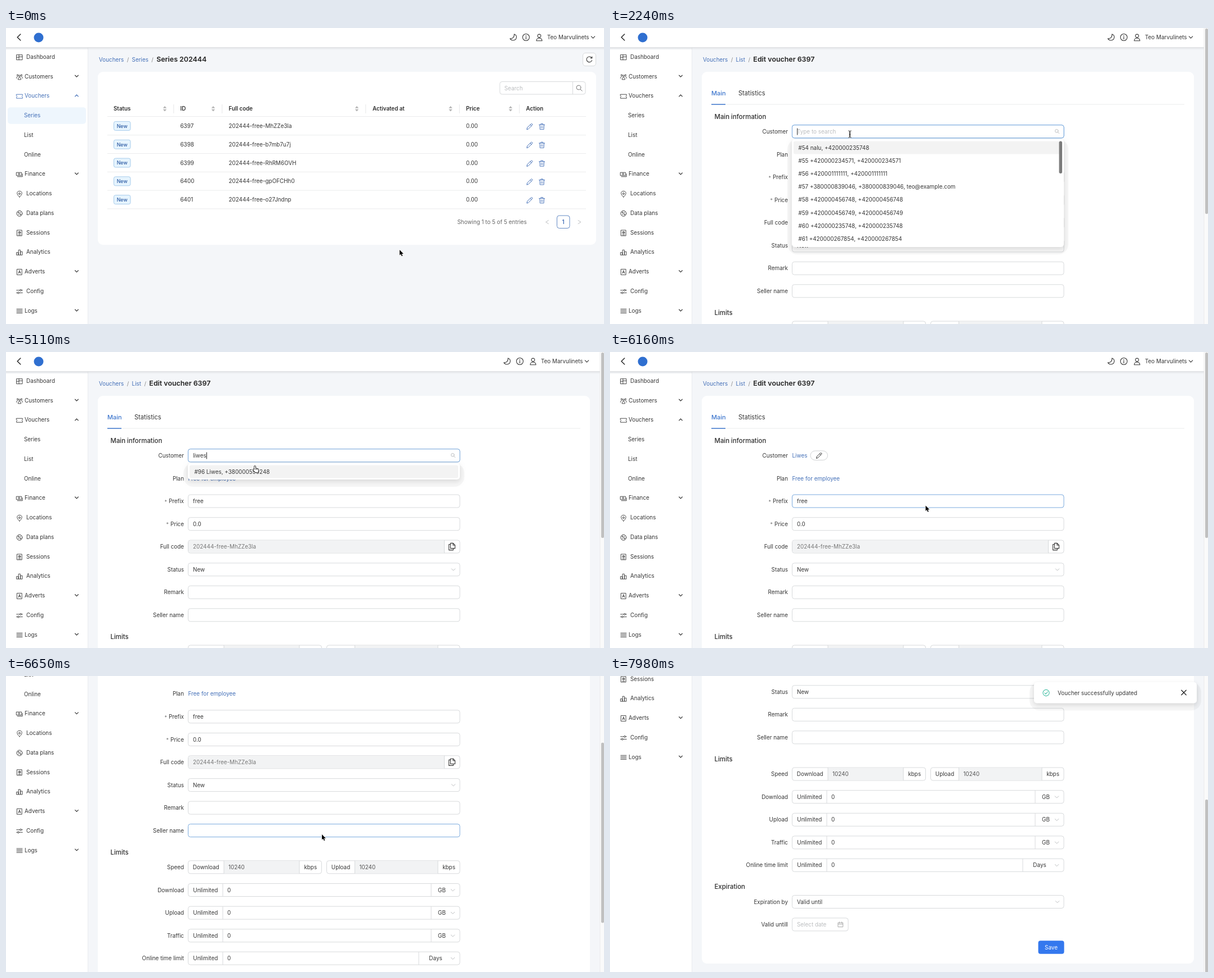
An HTML page with a canvas that plays this animation: 1062x527 px, repeating every 8750 ms.

```html
<!DOCTYPE html>
<html lang="en">
<head>
<meta charset="utf-8">
<title>Voucher editing</title>
<style>
html, body { margin: 0; width: 100%; height: 100%; overflow: hidden; background: #fff; }
canvas { display: block; width: 1062px; height: 527px; }
</style>
</head>
<body>
<canvas id="stage"></canvas>
<script>
const W = 1062, H = 527, LOOP = 8750, STEP = 70, MAX_SCROLL = 359;
const canvas = document.getElementById('stage');
const ctx = canvas.getContext('2d');
const dpr = window.devicePixelRatio || 1;
canvas.width = W * dpr;
canvas.height = H * dpr;

const INK = '#363636', BLUE = '#4470b8', LINE = '#d8dadc', PALE = '#bbbdbf', SOFT = '#f2f3f4', FOCUS = '#7aaade';
const OPEN = 2100, FILTER = 4130, PICK = 5250, EDIT = 1540;
const KEYS = [3080, 3290, 3500, 3640, 3780];
const QUERY = 'liwes', CUSTOMER = 'Liwes';

// time, x, y of the pointer
const PATH = [
  [0, 699, 395], [70, 800, 280], [140, 917, 157], [210, 917, 157], [350, 917, 171], [420, 917, 171],
  [770, 206, 292], [1050, 942, 159], [1120, 926, 177], [1680, 926, 177], [2030, 426, 189],
  [4760, 426, 189], [4970, 440, 203], [5250, 440, 203], [5460, 455, 210], [5530, 455, 210],
  [5670, 561, 270], [5810, 560, 258], [5950, 560, 265], [6020, 560, 265], [6300, 561, 282],
  [6930, 561, 282], [7210, 779, 476], [7420, 779, 476], [7840, 490, 386], [7910, 490, 504]
];

const ring = (r, x = 0, y = 0) => `M${x + r} ${y}a${r} ${r} 0 1 0 ${-2 * r} 0a${r} ${r} 0 1 0 ${2 * r} 0`;
const box = (x, y, w, h) => `M${x} ${y}h${w}v${h}h${-w}z`;
const ICONS = {
  Dashboard: box(-5, -4.5, 10, 9) + 'M-1-4.5v9M-5 0h4M-1-1h6',
  Customers: ring(1.5, 0, -1.5) + ring(1.2, -3.4, -3) + ring(1.2, 3.4, -3) + 'M-2.6 4.5c0-5 5.2-5 5.2 0zM-5.3 2.5c0-2 .5-3 2-3M5.3 2.5c0-2-.5-3-2-3',
  Vouchers: 'M-5.3-3.5h10.6v2.2a1.4 1.4 0 0 0 0 2.6v2.2h-10.6v-2.2a1.4 1.4 0 0 0 0-2.6z',
  Finance: box(-5.3, -3.5, 9, 5.5) + ring(1.4, -.8, -.8) + 'M-3.8 4h9v-5',
  Locations: 'M0 5.5C-6 .5-5.3-5 0-5S6 .5 0 5.5z' + ring(1.5, 0, -.5),
  'Data plans': ring(5) + ring(1, -1.8, -1.8) + ring(1, 1.8, 1.8) + 'M2.8-2.8l-5.6 5.6',
  Sessions: box(-4.2, -5, 8.4, 10) + ring(2, 0, -.7) + ring(.6, 0, -.7) + 'M-2 3.3h4',
  Analytics: box(-5, 0, 2.8, 4.5) + box(-1.4, -4.5, 2.8, 9) + box(2.2, -1.5, 2.8, 6),
  Adverts: box(-4.2, -5, 8.4, 10) + 'M-2 2.5L0-2.8 2 2.5M-1.3.8h2.6',
  Config: 'M-5.3-2.3h6M3.7-2.3h1.6M-5.3 2.3h1.6M-.7 2.3h6' + ring(1.5, 2.2, -2.3) + ring(1.5, -2.2, 2.3),
  Logs: 'M-5-3.6h10M-5-1.2h10M-5 1.2h10M-5 3.6h10',
  pencil: 'M-5 5l.8-3.2L2.4-4.5a1.4 1.4 0 0 1 2.1 2.1L-2.2 4.2zM1.1-3.2l2.1 2.1',
  trash: 'M-5-3.2h10M-1.8-3.2v-1.8h3.6v1.8M-3.9-3.2l.5 8.4h6.8l.5-8.4M-1.3-.6v3.4M1.3-.6v3.4',
  search: ring(3.9, -1, -1) + 'M1.8 1.8L5.2 5.2',
  reload: 'M4.6 1.6A4.9 4.9 0 1 1 4.2-2.6M4.8-5v2.8h-2.8',
  moon: 'M2-5.6C2.6 0-1 2.8-5.4 2.4 -2 7.4 6 6 6-.5 6-2.8 4.5-4.8 2-5.6z',
  info: ring(6) + 'M0-.8v4M0-3.2v1',
  user: ring(2.9, 0, -2.8) + 'M-5 6c0-6.5 10-6.5 10 0z',
  down: 'M-3.2-1.6L0 1.6 3.2-1.6',
  up: 'M-3.2 1.6L0-1.6 3.2 1.6',
  left: 'M2.4-3L-2.4 0 2.4 3',
  right: 'M-2.4-3L2.4 0-2.4 3',
  back: 'M2.8-5.6L-2.8 0 2.8 5.6',
  copy: 'M-2.5-5.8h4.5l3.2 3.2v5.6h-7.7zM1.8-5.6v3.2h3.2M-2.7-3.8h-2.5v9.6h7.4v-2.6',
  calendar: box(-4.4, -3.6, 8.8, 8) + 'M-4.4-.8h8.8M-2.2-5v2.4M2.2-5v2.4',
  done: ring(5.6) + 'M-2.6.2l2 2L2.8-2',
  close: 'M-4.2-4.2l8.4 8.4M4.2-4.2l-8.4 8.4'
};

const POINTERS = {
  arrow: 'M0 0v9.6l2.2-2 1.6 3.6 1.6-.7-1.6-3.5h3.1z',
  hand: 'M1.2.9c0-1.2 1.8-1.2 1.8 0v3.3l3.9.9c1.2.3 1.6 1 1.4 2.2l-.7 3.9h-4.8L-.6 7.3c-.9-1.2.3-2 1.1-1.2l.7.7z',
  beam: 'M-2.6-6c1.6 0 2.6.4 2.6 1.6v8.8c0 1.2-1 1.6-2.6 1.6M2.6-6C1-6 0-5.6 0-4.4v8.8C0 5.6 1 6 2.6 6M-1.2.8h2.4'
};
for (const set of [ICONS, POINTERS]) for (const k in set) set[k] = new Path2D(set[k]);

let now = 0, scroll = 0, px = 0, py = 0;

function text(s, x, y, color = INK, size = 9.9, weight = 400, align = 'left') {
  ctx.font = `${weight} ${size}px Inter, "Open Sans", sans-serif`;
  ctx.textAlign = align;
  ctx.fillStyle = color;
  ctx.fillText(s, x, y + size * 0.36);
  return ctx.measureText(s).width;
}

function rect(x, y, w, h, r, fill, stroke, width = 1) {
  ctx.beginPath();
  ctx.roundRect(x, y, w, h, r);
  if (fill) { ctx.fillStyle = fill; ctx.fill(); }
  if (stroke) { ctx.strokeStyle = stroke; ctx.lineWidth = width; ctx.stroke(); }
}

function line(x1, y1, x2, y2, color = LINE, width = 1) {
  ctx.beginPath();
  ctx.moveTo(x1, y1);
  ctx.lineTo(x2, y2);
  ctx.strokeStyle = color;
  ctx.lineWidth = width;
  ctx.stroke();
}

function icon(name, x, y, color = INK, size = 1, width = 1) {
  ctx.save();
  ctx.translate(x, y);
  ctx.scale(size, size);
  ctx.strokeStyle = color;
  ctx.lineWidth = width / size;
  ctx.lineJoin = ctx.lineCap = 'round';
  ctx.stroke(ICONS[name]);
  ctx.restore();
}

function popup(x, y, w, h) {
  rect(x - 8, y, w + 16, h + 13, 18, 'rgba(0,0,0,.035)');
  ctx.save();
  ctx.shadowColor = 'rgba(0,0,0,.13)';
  ctx.shadowBlur = 9 * dpr;
  ctx.shadowOffsetY = 3 * dpr;
  rect(x, y, w, h, 5, '#fff');
  ctx.restore();
}

const over = (x, y, w, h) => px >= x && px <= x + w && py + scroll >= y && py + scroll <= y + h;

function pointerAt(t) {
  let i = PATH.findIndex(p => p[0] > t);
  if (i < 0) i = PATH.length - 1;
  const [t0, x0, y0] = PATH[i - 1], [t1, x1, y1] = PATH[i];
  const k = Math.min(1, (t - t0) / (t1 - t0));
  return [x0 + (x1 - x0) * k, y0 + (y1 - y0) * k];
}

function scrollAt(t) {
  const k = Math.max(0, Math.min(1, (t - 6340) / 590));
  return MAX_SCROLL * k * k * (3 - 2 * k);
}

function header(shift) {
  const g = ctx.createLinearGradient(0, 34, 0, 39);
  g.addColorStop(0, 'rgba(0,0,0,.09)');
  g.addColorStop(1, 'rgba(0,0,0,0)');
  ctx.fillStyle = g;
  ctx.fillRect(0, 34, W, 5);
  ctx.fillStyle = '#fff';
  ctx.fillRect(0, 0, W, 34);
  icon('back', 23, 16.5, '#222', 1, 1.4);
  ctx.beginPath();
  ctx.arc(58, 17, 8.5, 0, 7);
  ctx.fillStyle = '#2f6fd0';
  ctx.fill();
  icon('moon', 900.5 - shift, 16.5, INK, 1, 1.1);
  icon('info', 923.5 - shift, 16.5, INK, 1, 1.1);
  icon('user', 947 - shift, 16.8, INK, 1, 1.1);
  text('Teo Marvulinets', 961 - shift, 16.8);
  icon('down', 1042.5 - shift, 16.5, INK, 1, 1.1);
}

function sidebar(inSeries) {
  ctx.fillStyle = '#fff';
  ctx.fillRect(0, 38, 145, 900);
  line(145.5, 35, 145.5, 938, '#eaecef');
  const items = ['Dashboard', 'Customers', 'Vouchers', 'Series', 'List', 'Online', 'Finance', 'Locations',
    'Data plans', 'Sessions', 'Analytics', 'Adverts', 'Config', 'Logs'];
  const groups = ['Customers', 'Vouchers', 'Finance', 'Adverts', 'Logs'];
  items.forEach((name, i) => {
    const y = 51.4 + 34.75 * i, group = groups.includes(name);
    const active = inSeries && (name === 'Vouchers' || name === 'Series');
    const color = active ? BLUE : INK;
    if (active && !group) rect(3, y - 14.5, 139, 29.5, 5, '#eef6fd');
    const sub = i > 2 && i < 6;
    text(name, sub ? 32 : group ? 33 : 36, y, color);
    if (!sub) icon(name, 24, y + .8, color, 1, .9);
    if (group) icon(name === 'Vouchers' ? 'up' : 'down', 125.5, y - .5, color, .88, 1.2);
  });
}

function crumbs(middle, title) {
  const put = (x, s, c, size, weight) => x + text(s, x, 56, c, size, weight) + 5.4;
  let x = put(165, 'Vouchers', BLUE);
  x = put(x, '/', '#888');
  x = put(x, middle, BLUE);
  x = put(x, '/', '#888');
  put(x, title, '#222', 12.4, 600);
}

function sorter(x) {
  ctx.fillStyle = '#b3b3b3';
  for (const d of [-1, 1]) {
    ctx.beginPath();
    ctx.moveTo(x - 3.2, 143.8 + d);
    ctx.lineTo(x + 3.2, 143.8 + d);
    ctx.lineTo(x, 143.8 + d * 4.8);
    ctx.fill();
  }
}

function listPage() {
  crumbs('Series', 'Series 202444');
  rect(1024.5, 44.5, 23, 23, 4.5, '#fff', LINE);
  icon('reload', 1036, 56, INK, 1, 1.1);
  rect(163, 78, 885, 308, 9, '#fff');
  rect(877, 95.5, 152, 22.5, 4, '#fff', LINE);
  line(1006.5, 95.5, 1006.5, 118);
  text('Search', 885, 107, PALE);
  icon('search', 1018, 107, '#777');

  const cols = [['Status', 191, 282], ['ID', 309.5, 368], ['Full code', 395.5, 623], ['Activated at', 651, 789.5],
    ['Price', 817, 896], ['Action', 923.5]];
  cols.forEach(([name, x, sort]) => {
    text(name, x, 143.8, '#2e2e2e', 9.8, 600);
    if (!sort) return;
    sorter(sort);
    line(sort + 15.8, 136, sort + 15.8, 152, '#e6e7e8');
  });
  line(180, 157.5, 1030, 157.5, '#ebeced');
  ['MhZZe3la', 'b7mb7u7j', 'RhRM6OVH', 'gpOFCHh0', 'o27Jndnp'].forEach((code, i) => {
    const y = 174.4 + 32.8 * i;
    rect(191.5, y - 8, 29.5, 16, 3, '#e6f4fe', '#a8cdec');
    text('New', 206.2, y + .2, '#2c5aa3', 8.8, 500, 'center');
    text(6397 + i, 309.5, y);
    text('202444-free-' + code, 395.5, y);
    text('0.00', 817, y);
    icon('pencil', 930, y + 1, BLUE);
    icon('trash', 951.7, y + 1, BLUE, 1, .9);
    line(180, y + 16.3, 1030, y + 16.3, '#ebeced');
  });
  text('Showing 1 to 5 of 5 entries', 801.5, 345, '#666');
  icon('left', 961, 345.5, PALE);
  rect(978.5, 334, 22.5, 22.5, 4, '#fff', '#6389c4');
  text('1', 989.7, 345.3, BLUE, 9.9, 600, 'center');
  icon('right', 1018.5, 345.5, PALE);
}

function label(s, y, required) {
  const w = text(s, 316, y, INK, 9.9, 400, 'right');
  if (required) text('*', 316 - w - 3, y + 1, '#777', 9, 400, 'right');
}

function field(y, value, color = INK, x = 323.5, w = 482.5) {
  rect(x, y - 11.5, w, 23, 4, '#fff', over(x, y - 11.5, w, 23) ? FOCUS : LINE);
  if (value) text(value, x + 8.5, y, color);
}

// A row of joined cells: left caption, input, right caption.
function group(y, x, a, b, end, caption, value, unit, disabled, select) {
  rect(x, y - 11.5, end - x, 23, 4, '#fff', LINE);
  if (disabled) {
    ctx.fillStyle = SOFT;
    ctx.fillRect(a, y - 11, b - a, 22);
  }
  const lit = !disabled && over(a, y - 11.5, b - a, 23);
  if (lit) rect(a, y - 11.5, b - a, 23, 0, null, FOCUS);
  else {
    line(a, y - 11.5, a, y + 11.5);
    line(b, y - 11.5, b, y + 11.5);
  }
  text(caption, (x + a) / 2, y, INK, 9.9, 400, 'center');
  text(value, a + 8, y, disabled ? '#555' : INK);
  text(unit, select ? (b + end) / 2 - 6.5 : (b + end) / 2, y, INK, 9.9, 400, 'center');
  if (select) icon('down', 793.5, y + .3, PALE);
}

function customerRow() {
  label('Customer', 184.3);
  if (now >= PICK) {
    text(CUSTOMER, 323.5, 184, BLUE);
    rect(356, 176, 30.5, 16.5, 8.2, '#fff', '#d0d2d4');
    icon('pencil', 371.3, 184.3, INK, .95);
    return;
  }
  const open = now >= OPEN;
  if (open) rect(322.3, 171.6, 485, 25.2, 5, 'rgba(70,140,230,.08)');
  field(184.3);
  if (open) rect(323.5, 172.8, 482.5, 23, 4, '#fff', FOCUS);
  const typed = QUERY.slice(0, KEYS.filter(k => now >= k).length);
  const w = typed ? text(typed, 332, 184.3) : (text('Type to search', 332, 184.3, PALE), 0);
  const off = (now >= 2730 && now < 3080) || (now >= 4340 && now < 4830);
  if (open && !off) line(332.7 + w, 178.5, 332.7 + w, 190.5, '#222');
  icon('search', 794, 184, PALE, .72);
}

function dropdown() {
  const all = now < FILTER;
  const pair = (id, n) => `#${id} +420${n}, +420${n}`;
  const items = all ? [
    '#54 nalu, +420000235748', pair(55, '000234571'), pair(56, '001111111'),
    '#57 +380000839046, +380000839046, teo@example.com',
    pair(58, '000456748'), pair(59, '000456749'), pair(60, '000235748'), pair(61, '000267854')
  ] : [`#96 ${CUSTOMER}, +380000590248`];
  popup(323, 198, 483, all ? 192 : 29);
  rect(326, 201.5, 477, 23, 3, '#f3f3f3');
  items.forEach((s, i) => text(s, 334.5, 213 + 23.2 * i));
  if (all) rect(797.5, 201.5, 5.5, 57.5, 2.7, '#7b7b7b');
}

function editPage() {
  crumbs('List', 'Edit voucher 6397');
  rect(163, 78, 874, 793, 9, '#fff');
  line(180, 136, 1020, 136, '#ebeced');
  text('Main', 180, 116.3, '#3d76cd', 11, 500);
  text('Statistics', 228, 116.3, INK, 11.1);
  line(180, 136, 205, 136, '#3d76cd', 1.5);

  const heading = (s, y) => text(s, 185.5, y, '#2e2e2e', 11.4, 500);
  heading('Main information', 157.8);
  customerRow();
  label('Plan', 225);
  text('Free for employee', 323.5, 225, BLUE);
  label('Prefix', 265.5, true);
  field(265.5, 'free');
  label('Price', 306.2, true);
  field(306.2, '0.0');
  label('Full code', 346.6);
  rect(323.5, 335, 482.5, 23, 4, '#fff', LINE);
  rect(324, 335.5, 454, 22, [4, 0, 0, 4], SOFT);
  line(778.5, 335, 778.5, 358);
  text('202444-free-MhZZe3la', 332, 346.6, '#777');
  icon('copy', 792, 346.5, INK, 1.05, 1.1);
  label('Status', 387.3);
  field(387.3, 'New');
  icon('down', 794.5, 387.5, PALE);
  label('Remark', 427.8);
  field(427.8);
  label('Seller name', 468.3);
  field(468.3);

  heading('Limits', 506.8);
  label('Speed', 533.5);
  group(533.5, 323.5, 387, 521, 560.5, 'Download', '10240', 'kbps', true);
  group(533.5, 569.5, 619.5, 767, 806, 'Upload', '10240', 'kbps', true);
  ['Download', 'Upload', 'Traffic'].forEach((s, i) => {
    const y = 574.2 + 40.6 * i;
    label(s, y);
    group(y, 323.5, 385, 755, 806, 'Unlimited', '0', 'GB', false, true);
  });
  label('Online time limit', 695.8);
  group(695.8, 323.5, 385, 733, 806, 'Unlimited', '0', 'Days', false, true);

  heading('Expiration', 734.3);
  label('Expiration by', 761);
  field(761, 'Valid until');
  icon('down', 794.5, 761.2, PALE);
  label('Valid untill', 801.4);
  field(801.4, 'Select date', PALE, 323.5, 99.5);
  icon('calendar', 409.5, 801.6, '#aaa', .95);
  rect(760.5, 830.3, 46, 23.5, 4, over(760, 830, 46, 24) ? '#5f99f8' : '#3478ee');
  text('Save', 783.5, 842.2, '#fff', 9.9, 400, 'center');
  if (now >= OPEN && now < PICK) dropdown();
}

function scrollbar() {
  ctx.fillStyle = '#fafafa';
  ctx.fillRect(1055, 0, 7, H);
  line(1055, 0, 1055, H, '#e9e9e9', .8);
  const h = 330 - 22 * Math.max(0, (scroll - 72) / (MAX_SCROLL - 72));
  rect(1057, scroll * .61 + 1, 5, h, 2, '#c0c0c0');
}

function notice() {
  const k = Math.max(0, Math.min(1, (now - 7560) / 210));
  if (!k) return;
  const dx = 309 * (1 - k) ** 2;
  ctx.save();
  ctx.globalAlpha = k;
  ctx.translate(dx, 0);
  popup(753, 11, 289, 37.5);
  icon('done', 774.5, 30, '#45bfa5', 1, 1.1);
  text('Voucher successfully updated', 795, 30);
  icon('close', 1019, 29.5, '#222', 1, 1.3);
  ctx.restore();
}

function pointer() {
  if ((now >= 3150 && now < 4830) || now >= 7980) return;
  let kind = 'arrow';
  if (now >= 1960 && now < 4900) kind = 'beam';
  else if ((now >= 4900 && now < 5320) || (now >= EDIT && over(760, 830, 46, 24))) kind = 'hand';
  const shape = POINTERS[kind];
  ctx.save();
  ctx.translate(px, py);
  ctx.lineJoin = 'round';
  ctx.strokeStyle = kind === 'hand' ? '#111' : '#fff';
  ctx.lineWidth = kind === 'hand' ? 1.7 : 1.6;
  ctx.stroke(shape);
  if (kind === 'beam') {
    ctx.strokeStyle = '#111';
    ctx.lineWidth = 1;
    ctx.stroke(shape);
  } else {
    ctx.fillStyle = kind === 'hand' ? '#fff' : '#000';
    ctx.fill(shape);
    if (kind === 'hand') {
      ctx.beginPath();
      for (const x of [3.1, 4.8, 6.4]) {
        ctx.moveTo(x, 4.8);
        ctx.lineTo(x, 6.6);
      }
      ctx.strokeStyle = '#111';
      ctx.lineWidth = .7;
      ctx.stroke();
    }
  }
  ctx.restore();
}

function draw(ms) {
  now = Math.floor((ms % LOOP) / STEP) * STEP;
  scroll = scrollAt(now);
  [px, py] = pointerAt(now);
  const editing = now >= EDIT;
  ctx.setTransform(dpr, 0, 0, dpr, 0, 0);
  ctx.fillStyle = '#f4f6f9';
  ctx.fillRect(0, 0, W, H);
  ctx.save();
  ctx.translate(0, -scroll);
  sidebar(!editing);
  header(editing ? 11 : 0);
  if (editing) editPage();
  else listPage();
  ctx.restore();
  if (editing) scrollbar();
  notice();
  pointer();
}

const start = performance.now();
function tick() {
  draw(performance.now() - start);
  requestAnimationFrame(tick);
}
tick();
</script>
</body>
</html>
```
